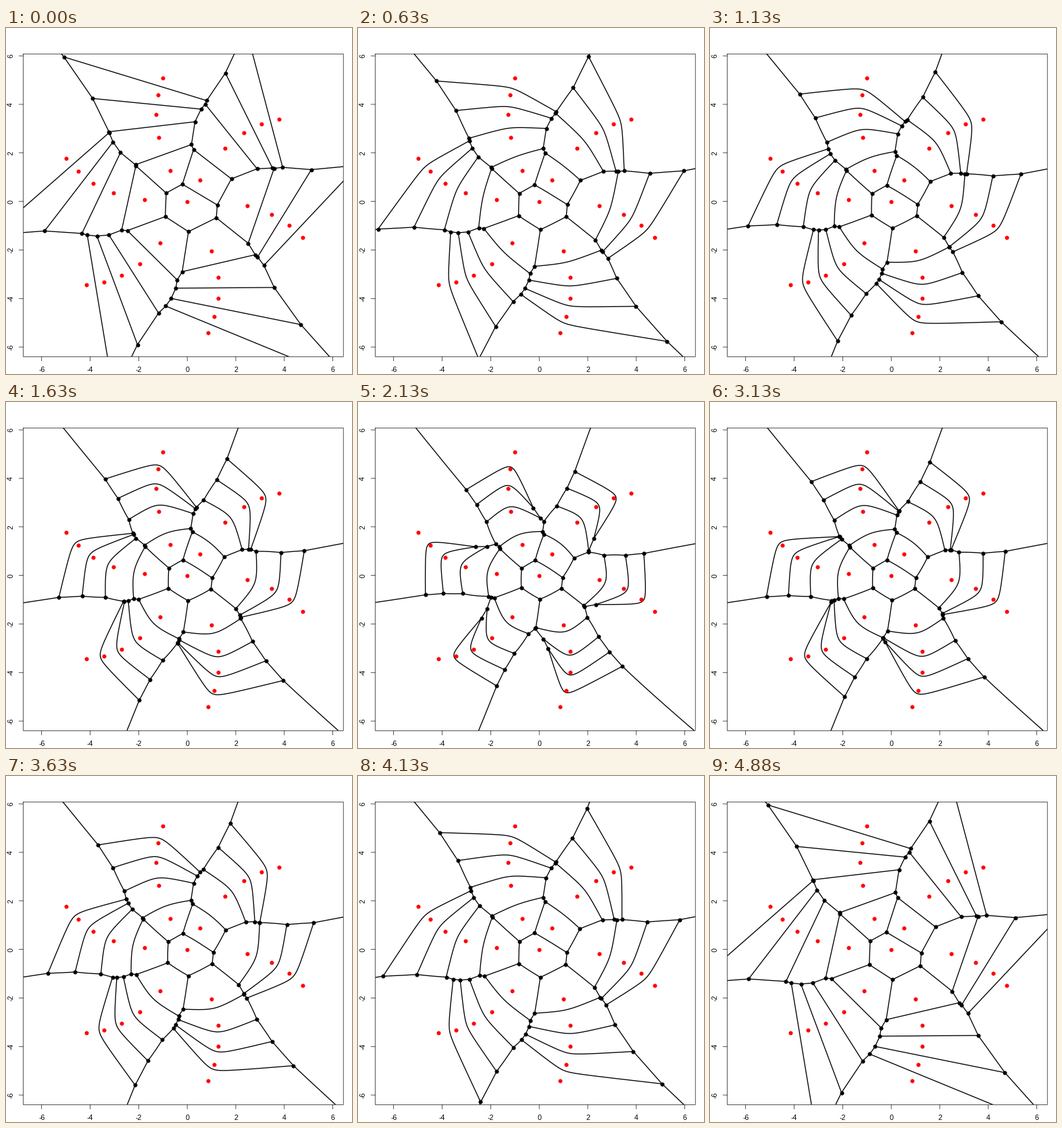
A matplotlib script for the animation above (5000 ms loop, 512 by 512 pixels).

```python
"""Additively weighted Voronoi diagram of a Fermat spiral, weights growing and shrinking."""
from itertools import combinations

import numpy as np
import matplotlib.pyplot as plt
from matplotlib.animation import FuncAnimation

SIZE, DPI = 512, 64
PX = 72 / DPI                                     # one pixel in points
LEFT, RIGHT, TOP, BOTTOM = 25.6, 499.2, 38.4, 486.4
LINE = 12.8                                       # height of one margin line
THIN, THICK = 2 / 3 * PX, 4 / 3 * PX

N, STEPS = 30, 20
MAX_WEIGHT = 3.0
REACH = 20                                        # how far open edges are followed

theta = np.linspace(0, 30, N)
sites = np.sqrt(theta)[:, None] * np.column_stack([np.cos(theta), np.sin(theta)])
triples = np.array(list(combinations(range(N), 3)))

# Same padded range on both axes, with equal scales
lo, hi = sites.min(), sites.max()
centre = (lo + hi) / 2
scale = (BOTTOM - TOP) / ((hi - lo) * 1.1 * 1.08)


def to_px(x, y):
    return ((LEFT + RIGHT) / 2 + (x - centre) * scale,
            (TOP + BOTTOM) / 2 - (y - centre) * scale)


def nearest(points, w):
    """Smallest weighted distance from each point to any site."""
    gaps = points[:, None, :] - sites[None]
    return (np.hypot(gaps[..., 0], gaps[..., 1]) - w).min(axis=1)


def find_vertices(w):
    """Points at equal weighted distance from three sites and no closer to others."""
    i, j, k = triples.T
    dj, dk = sites[j] - sites[i], sites[k] - sites[i]
    ej, ek = w[j] - w[i], w[k] - w[i]
    kj = ((dj ** 2).sum(1) - ej ** 2) / 2
    kk = ((dk ** 2).sum(1) - ek ** 2) / 2
    det = dj[:, 0] * dk[:, 1] - dj[:, 1] * dk[:, 0]

    def solve(p, q):
        return np.column_stack([p * dk[:, 1] - q * dj[:, 1],
                                q * dj[:, 0] - p * dk[:, 0]]) / det[:, None]

    # The offset from site i is a + b * rho, with length rho
    a, b = solve(kj, kk), solve(-ej, -ek)
    qa, qb, qc = (b ** 2).sum(1) - 1, (a * b).sum(1), (a ** 2).sum(1)
    disc = qb ** 2 - qa * qc
    root = np.sqrt(np.maximum(disc, 0))
    points, owners = [], []
    for sign in (1, -1):
        rho = (-qb + sign * root) / qa
        p = sites[i] + a + b * rho[:, None]
        ok = (disc >= 0) & (rho > 0)
        ok[ok] = nearest(p[ok], w) > (rho - w[i])[ok] - 1e-7
        points.append(p[ok])
        owners.append(triples[ok])
    return np.vstack(points), np.vstack(owners)


def find_edges(w, points, owners):
    """Hyperbola arcs between vertices, as one path broken by NaN."""
    ends = {}
    for p, trio in zip(points, owners):
        for pair in combinations(trio, 2):
            ends.setdefault(pair, []).append(p)
    path = []
    for (i, j), pts in ends.items():
        d = sites[j] - sites[i]
        c = np.hypot(*d) / 2
        e = d / (2 * c)
        n = np.array([-e[1], e[0]])
        a = (w[j] - w[i]) / 2
        b = np.sqrt(c * c - a * a)
        mid = (sites[i] + sites[j]) / 2

        def arc(s):
            s = np.atleast_1d(s)[:, None]
            return mid - a * np.cosh(s) * e + b * np.sinh(s) * n

        limit = np.arcsinh(REACH / b)
        cuts = np.arcsinh((np.array(pts) - mid) @ n / b)
        cuts = np.sort(np.r_[-limit, cuts[abs(cuts) < limit], limit])
        for s0, s1 in zip(cuts[:-1], cuts[1:]):
            m = arc((s0 + s1) / 2)
            if nearest(m, w)[0] > np.hypot(*(m[0] - sites[i])) - w[i] - 1e-7:
                path += [arc(np.linspace(s0, s1, 80)), [[np.nan, np.nan]]]
    return np.vstack(path)


fig = plt.figure(figsize=(SIZE / DPI, SIZE / DPI), dpi=DPI, facecolor="white")


def layer(x0, y0, x1, y1):
    """Borderless axes in pixel units, with y pointing down."""
    ax = fig.add_axes([x0 / SIZE, 1 - y1 / SIZE, (x1 - x0) / SIZE, (y1 - y0) / SIZE])
    ax.set(xlim=(x0, x1), ylim=(y1, y0))
    ax.axis("off")
    return ax


plot = layer(LEFT, TOP, RIGHT, BOTTOM)
frame = layer(0, 0, SIZE, SIZE)


def rule(xs, ys):
    frame.plot(xs, ys, color="black", lw=THIN, snap=False, solid_capstyle="round")


def label(x, y, text, angle=0):
    frame.text(x, y, text, rotation=angle, rotation_mode="anchor", ha="center",
               va="baseline", family="Liberation Sans", size=10.67 * PX)


rule([LEFT, RIGHT, RIGHT, LEFT, LEFT], [TOP, TOP, BOTTOM, BOTTOM, TOP])
for v in range(-6, 7, 2):
    x, y = to_px(v, v)
    rule([x, x], [BOTTOM, BOTTOM + LINE / 2])
    rule([LEFT, LEFT - LINE / 2], [y, y])
    label(x, BOTTOM + 1.8 * LINE, str(v))
    label(LEFT - 1.2 * LINE, y, str(v), 90)


def dots(color, z):
    return plot.plot([], [], "o", color=color, ms=5.33 * PX, mew=THIN,
                     snap=False, zorder=z)[0]


edges, = plot.plot([], [], color="black", lw=THICK, snap=False, zorder=1,
                   solid_capstyle="round", solid_joinstyle="round")
corners = dots("black", 2)
dots("red", 3).set_data(*to_px(*sites.T))


def update(f):
    step = min(f, 2 * STEPS - 1 - f)
    w = MAX_WEIGHT * step / (STEPS - 1) * np.arange(N) / (N - 1)
    points, owners = find_vertices(w)
    edges.set_data(*to_px(*find_edges(w, points, owners).T))
    corners.set_data(*to_px(*points.T))
    return edges, corners


anim = FuncAnimation(fig, update, frames=2 * STEPS, interval=125,
                     repeat=True, repeat_delay=0)
plt.show()
```
